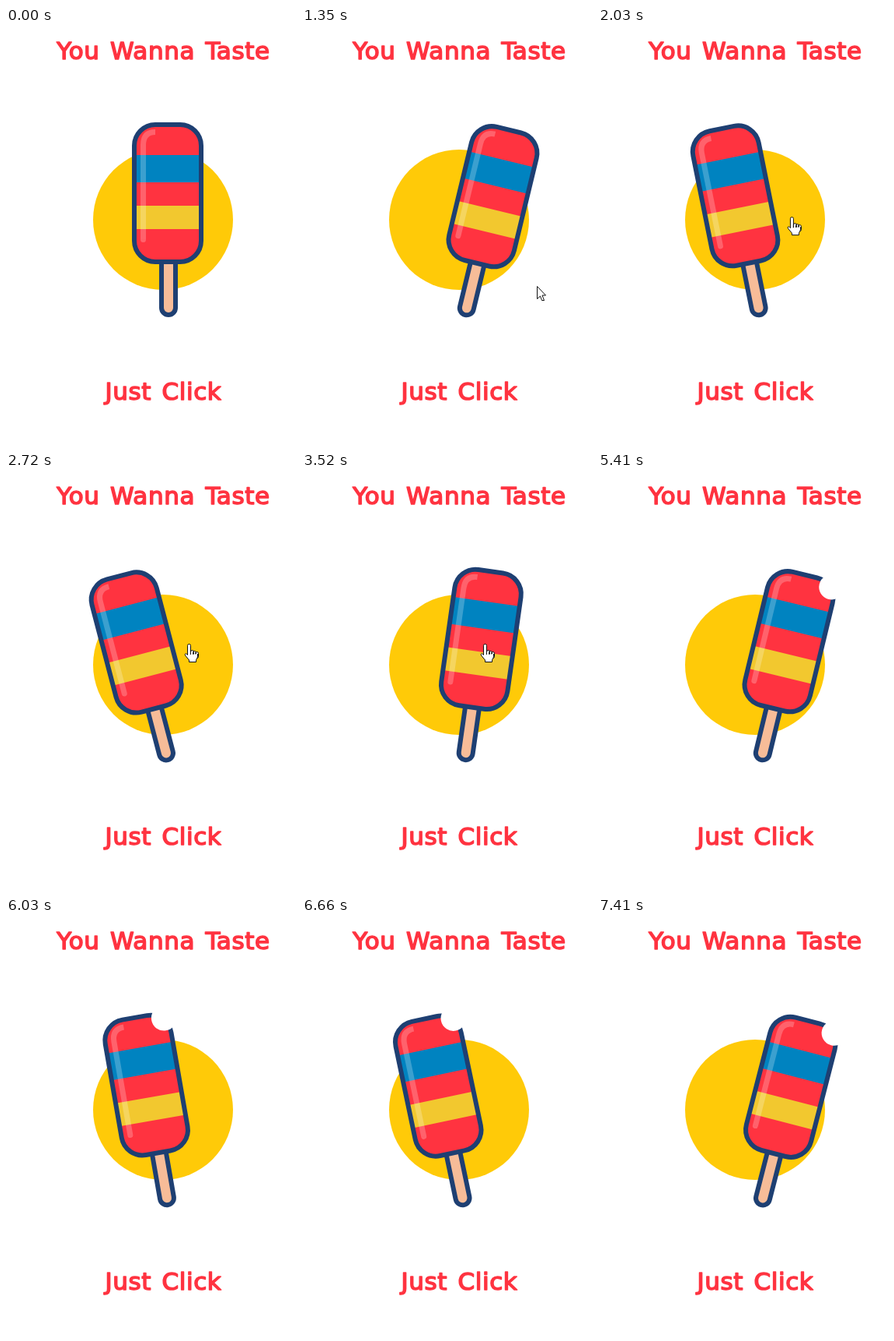
An HTML page with a canvas for the animation above (7.48 s loop, 373x535 px).

```html
<!DOCTYPE html>
<html lang="en">
<head>
<meta charset="utf-8">
<title>Popsicle</title>
<style>
  html, body { margin: 0; width: 100%; height: 100%; overflow: hidden; background: #fff; }
  canvas { display: block; }
</style>
</head>
<body>
<canvas id="stage" width="373" height="535"></canvas>
<script>
const ctx = document.getElementById('stage').getContext('2d');
const LOOP = 7480;
const BITE_TIME = 4060;
const TILT = 15;
const RED = '#ff3340', BLUE = '#0083c0', YELLOW = '#f2c82f';
const SUN = '#ffca08', NAVY = '#1e3f72', PEACH = '#f7bc98';
const pivot = { x: 209, y: 371 };
const sun = { x: 202, y: 246, r: 90 };

const progress = (t, from, to) => Math.min(1, Math.max(0, (t - from) / (to - from)));
const mix = (a, b, u) => a + (b - a) * u;
const settle = u => (u * (2 - u)) ** 1.4;
const accelerate = u => u * u;
const smooth = u => u * u * (3 - 2 * u);

// Tilt right, fall left, wait there until `back`, swing right again, come to rest.
function swing(t, start, back) {
  const peak = start + 2620;
  const rise = settle(progress(t, start, start + 550));
  const fall = settle(progress(t, start + 550, start + 1600));
  const comeback = accelerate(progress(t, back, peak));
  const rest = settle(progress(t, peak, peak + 460));
  return TILT * (rise - 2 * fall + 2 * comeback - rest);
}

const angleAt = t => t < BITE_TIME ? swing(t, 740, 2650) : swing(t, 4800, 6300);

function cursorAt(t) {
  const enter = smooth(progress(t, 400, 1080));
  const reach = smooth(progress(t, 1500, 2250));
  const leave = smooth(progress(t, 4230, 4690));
  const path = (a, b, c, d) => mix(mix(mix(a, b, enter), c, reach), d, leave);
  return { x: path(318, 302.5, 235.5, 375), y: path(482, 331.5, 220, 536) };
}

function disc(x, y, r, color) {
  ctx.fillStyle = color;
  ctx.beginPath();
  ctx.arc(x, y, r, 0, Math.PI * 2);
  ctx.fill();
}

function label(text, y) {
  ctx.font = '31px "DejaVu Sans", sans-serif';
  ctx.textAlign = 'center';
  ctx.letterSpacing = '0.6px';
  ctx.wordSpacing = '3px';
  ctx.lineJoin = 'round';
  ctx.lineWidth = 1.6;
  ctx.fillStyle = ctx.strokeStyle = RED;
  ctx.fillText(text, 202.5, y);
  ctx.strokeText(text, 202.5, y);
}

function outlined(path, fill, stroke, width) {
  ctx.fillStyle = fill;
  ctx.strokeStyle = stroke;
  ctx.lineWidth = width;
  ctx.fill(path);
  ctx.stroke(path);
}

const stick = new Path2D();
stick.roundRect(200, 280, 18, 88, 9);
const body = new Path2D();
body.roundRect(165, 124, 86, 176, 27);
const shine = new Path2D('M192 133.5Q176.5 133.5 176.5 150V271.5');
const arrow = new Path2D('M0 0V16L4 12.5L6 18H9L6.5 11.5H11Z');

const hand = new Path2D();
hand.roundRect(-2, -0.5, 4, 16, 2);
for (const knuckle of [1, 2, 3]) hand.roundRect(knuckle * 3 - 1, 6.5 + knuckle, 4, 8, 2);
const palm = new Path2D('M-2 13.5L-4 11.5Q-6 12 -5 14L0 20V22.5H9V20L11 16V12');

function popsicle(angle, bitten) {
  ctx.save();
  ctx.translate(pivot.x, pivot.y);
  ctx.rotate(angle * Math.PI / 180);
  ctx.translate(-pivot.x, -pivot.y);
  outlined(stick, PEACH, NAVY, 6);

  ctx.save();
  ctx.clip(body);
  for (const [color, y, h] of [[RED, 124, 176], [BLUE, 163, 35], [YELLOW, 228, 30]]) {
    ctx.fillStyle = color;
    ctx.fillRect(165, y, 86, h);
  }
  ctx.restore();

  ctx.lineWidth = 7;
  ctx.strokeStyle = ctx.fillStyle = 'rgba(255,255,255,.23)';
  ctx.stroke(shine);
  ctx.beginPath();
  ctx.arc(176.5, 271.5, 3.5, 0, Math.PI);
  ctx.fill();

  ctx.strokeStyle = NAVY;
  ctx.lineWidth = 6;
  ctx.stroke(body);
  if (bitten) disc(245, 131, 16.2, '#fff');
  ctx.restore();
}

function cursor(t) {
  if (t < 400 || t > 4660) return;
  const { x, y } = cursorAt(t);
  const hovering = Math.hypot(x - sun.x, y - sun.y) < sun.r;
  ctx.save();
  ctx.translate(x, y);
  if (hovering) {
    outlined(hand, '#fff', '#111', 1);
    outlined(palm, '#fff', '#111', 1);
  } else {
    outlined(arrow, '#fff', '#111', 1);
  }
  ctx.restore();
}

function draw(t) {
  ctx.fillStyle = '#fff';
  ctx.fillRect(0, 0, 373, 535);
  label('You Wanna Taste', 40);
  label('Just Click', 477);
  disc(sun.x, sun.y, sun.r, SUN);
  popsicle(angleAt(t), t >= BITE_TIME);
  cursor(t);
}

let start;
function frame(now) {
  start ??= now;
  draw((now - start) % LOOP);
  requestAnimationFrame(frame);
}
draw(0);
requestAnimationFrame(frame);
</script>
</body>
</html>
```
